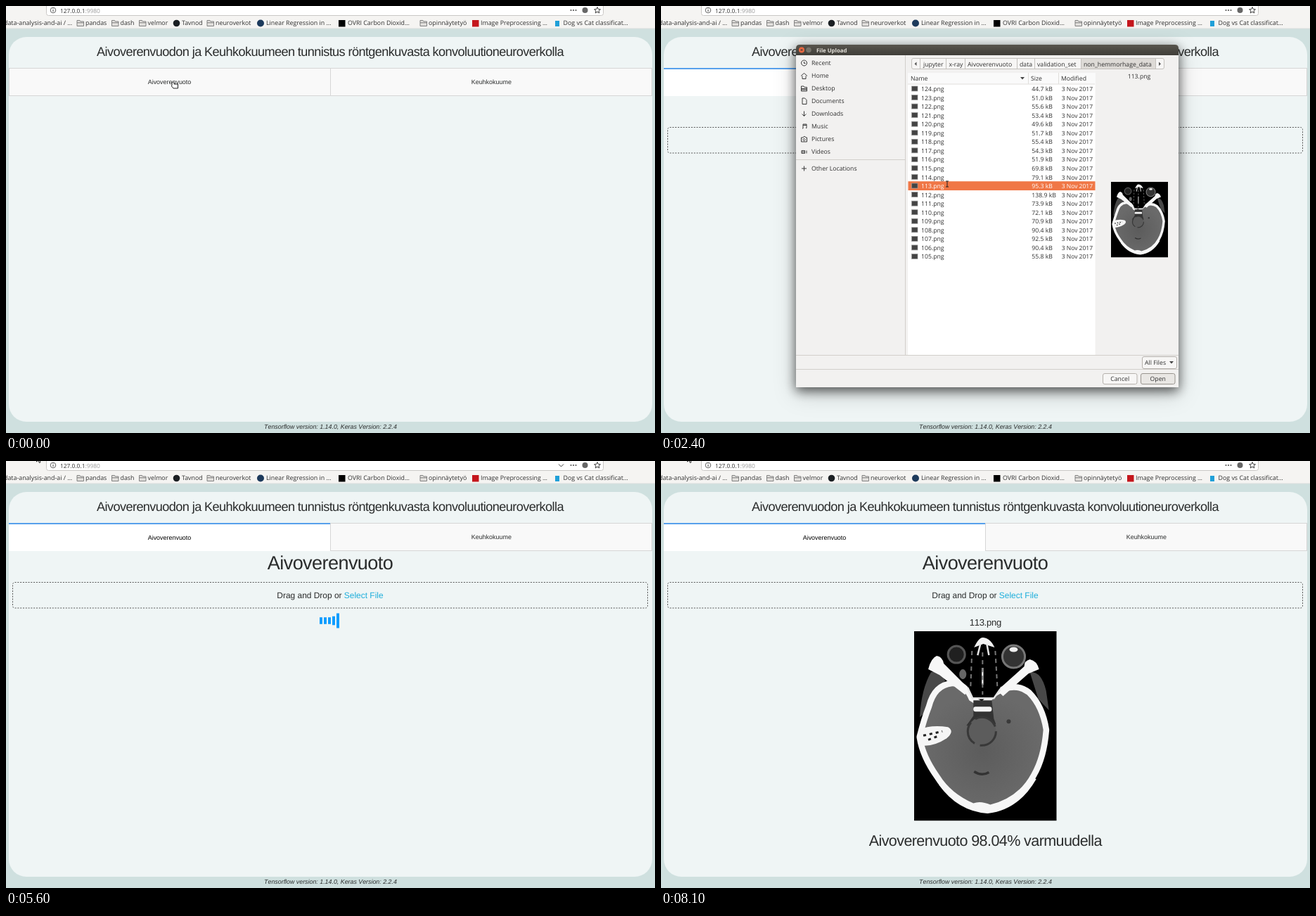
Animation, 923 px wide and 607 px high, one loop 9700 ms. Source, as an HTML page:

```html
<!DOCTYPE html>
<html lang="fi">
<head>
<meta charset="utf-8">
<title>Aivoverenvuoto</title>
<style>
html, body { margin: 0; width: 100%; height: 100%; overflow: hidden; background: #cfe0df; }
svg { display: block; }
text { font: 9px "Liberation Sans", Arial, sans-serif; font-kerning: none; text-rendering: geometricPrecision; fill: #2a2c2c; white-space: pre; }
.ui text { font: 500 8.7px "Open Sans", "Noto Sans", sans-serif; fill: #303030; }
.ui.bar text { font-size: 8.85px; }
.mid { text-anchor: middle; }
.tight { letter-spacing: -.6px; }
.line { fill: none; stroke: #3b3b3b; }
#dialog { filter: drop-shadow(0 5px 8px #0009) drop-shadow(0 6px 14px #0003); }
</style>
</head>
<body>
<svg id="stage" width="923" height="607" viewBox="0 0 923 607">
  <defs>
    <linearGradient id="dark" x2="0" y2="1"><stop stop-color="#58554d"/><stop offset="1" stop-color="#403e39"/></linearGradient>
    <radialGradient id="brain" cy=".55"><stop stop-color="#5c5c5c"/><stop offset="1" stop-color="#6a6a6a"/></radialGradient>
    <symbol id="scan" viewBox="0 0 202 269" preserveAspectRatio="none">
      <path d="M0 0H202V269H0Z"/>
      <path fill="#484848" d="M24 58Q38 54 44 70L28 104 8 122Q10 82 24 58ZM164 58Q180 56 187 84L191 112 176 96Z"/>
      <path fill="url(#brain)" stroke="#f7f7f7" stroke-width="17" stroke-linejoin="round" paint-order="stroke"
        d="M25 108Q32 80 54 78 70 78 78 98L97 110 116 92Q142 76 160 90 178 108 183 140 180 178 166 202 148 236 108 246 94 240 84 244 52 230 36 204 16 176 12 150 18 126 25 108Z"/>
      <path fill="#f7f7f7" d="M20 54Q24 38 32 35 40 36 42 46L78 82 72 90 36 62ZM177 54Q174 42 164 40 156 42 156 50L118 84 126 92 162 60Z"/>
      <path fill="none" stroke="#f7f7f7" stroke-width="7" d="M38 216Q64 252 104 255 146 250 170 208"/>
      <circle cx="60" cy="33" r="12" fill="#202020" stroke="#555" stroke-width="3"/>
      <circle cx="141" cy="36" r="16" fill="#333" stroke="#777" stroke-width="3"/>
      <ellipse cx="141" cy="26" rx="6" ry="3.5" fill="#eee"/>
      <path d="M80 22Q98 8 118 22L122 80 114 95H82L76 78Z"/>
      <path fill="#f2f2f2" d="M85 23Q92 8 98 9 108 10 114 23L98 18Z"/>
      <path fill="none" stroke="#e5e5e5" stroke-width="2.5" d="M94 18L90 34M103 18L106 34M97 52V76M76 80L83 95H113L122 82"/>
      <path fill="none" stroke="#777" stroke-width="2" stroke-dasharray="6 5" d="M82 28L80 80M115 28L118 80M97 30V90"/>
      <ellipse cx="69" cy="61" rx="5" ry="7" fill="#666"/>
      <path fill="#333" d="M84 98H110L113 124 116 132 74 134 84 120Z"/>
      <rect x="84" y="107" width="26" height="7" rx="3" fill="#f4f4f4"/>
      <circle cx="96" cy="142" r="20" fill="#5c5c5c" stroke="#383838" stroke-width="3" stroke-dasharray="34 8"/>
      <circle cx="134" cy="128" r="3" fill="#3a3a3a"/>
      <path fill="#f5f5f5" d="M6 140Q24 132 48 136 58 142 46 152 28 164 10 162Z"/>
      <path fill="none" stroke="#222" stroke-width="3" stroke-dasharray="4 5" d="M13 148L40 142M20 154L36 148"/>
      <path fill="none" stroke="#333" stroke-width="3.5" d="M85 199Q96 206 106 200"/>
    </symbol>
    <symbol id="slice" viewBox="0 0 96 108" preserveAspectRatio="none">
      <path d="M0 0H96V108H0Z"/>
      <path fill="#f4f4f4" d="M48 3C74 2 91 30 93 60 94 88 76 106 49 106 22 106 3 90 4 60 5 28 22 3 48 3Z"/>
      <path fill="#606060" d="M48 11C69 10 84 34 86 60 87 84 70 98 49 98 28 98 10 84 11 60 12 32 28 11 48 11Z"/>
      <path fill="none" stroke="#505050" stroke-width="3" d="M27 28Q18 46 20 70M72 28Q80 50 77 76M34 82Q26 76 27 64"/>
      <path fill="none" stroke="#2d2d2d" stroke-width="3" d="M30 20L40 14M36 24L46 26M56 14L66 22"/>
      <path fill="none" stroke="#8a8a8a" stroke-width="1.6" d="M48 12V98M42 34L48 40 56 34"/>
    </symbol>
  </defs>

  <path fill="#cfe0df" d="M0 0H923V607H0Z"/>
  <rect x="4" y="44" width="915" height="547" rx="25" fill="#eff5f5"/>
  <text class="mid tight" x="461" y="71" style="font-size:18.15px">Aivoverenvuodon ja Keuhkokuumeen tunnistus röntgenkuvasta konvoluutioneuroverkolla</text>
  <rect x="4.5" y="88.5" width="914" height="39" fill="#f9f9f9" stroke="#d6d6d6"/>
  <path stroke="#d6d6d6" d="M461.5 88V128"/>
  <g id="active"><path fill="#fff" d="M4 88H461V128H4Z"/><path fill="#1f80e6" d="M4 88.3H461V89.8H4Z"/></g>
  <text id="tab" class="mid" x="232.5" style="font-size:8.95px">Aivoverenvuoto</text>
  <text class="mid" x="690.3" y="111" style="font-size:8.95px">Keuhkokuume</text>
  <text class="mid" x="461.5" y="601" style="font-size:8.85px;font-style:italic">Tensorflow version: 1.14.0, Keras Version: 2.2.4</text>

  <g id="content">
    <text class="mid tight" x="461" y="153.5" style="font-size:27.1px">Aivoverenvuoto</text>
    <rect x="9.5" y="172.5" width="903" height="36.5" rx="3" fill="none" stroke="#555" stroke-dasharray="2 1.8"/>
    <text x="385.3" y="195" style="font-size:11.95px">Drag and Drop or <tspan id="link">Select File</tspan></text>
  </g>
  <g id="loader"></g>
  <text id="file" class="mid" x="461.3" y="233.5" style="font-size:13.1px;letter-spacing:-.3px">113.png</text>
  <text id="result" class="mid tight" x="461.3" y="547" style="font-size:21.55px">Aivoverenvuoto 98.04% varmuudella</text>
  <use id="photo" href="#scan" x="360" y="242" width="202.7" height="269.6"/>

  <g id="browser" class="ui bar"></g>
  <g id="dialog" class="ui"></g>
  <g id="cursor" stroke-linejoin="round">
    <path id="arrow" fill="#fff" stroke="#222" d="M.5 .5V10L2.8 8 4.4 11.5 6 10.8 4.5 7.4H7.5Z"/>
    <path id="hand" fill="#fff" stroke="#222" d="M-2 5V2Q-.5 0 1 2V4H6.5V10H0L-2.5 7Z"/>
    <path id="beam" fill="none" stroke="#222" d="M1 -1H5M3 -1V7M1 7H5"/>
  </g>
</svg>
<script>
const $ = id => document.getElementById(id);
const text = (x, y, s, extra = '') => `<text x="${x}" y="${y}" ${extra}>${s}</text>`;
const box = (x, y, w, h, fill, extra = '') => `<rect x="${x}" y="${y}" width="${w}" height="${h}" fill="${fill}" ${extra}/>`;
const path = (d, extra = 'class="line"') => `<path d="${d}" ${extra}/>`;
const dot = (x, y, r, fill) => `<circle cx="${x}" cy="${y}" r="${r}" fill="${fill}"/>`;
const grey = 'stroke="#c4c1bd"';

// Browser toolbar and bookmarks
const folders = [[101, 'pandas'], [150.5, 'dash'], [189.5, 'velmor'], [286, 'neuroverkot'], [589, 'opinnäytetyö']];
const links = [[-3, 'data-analysis-and-ai / …'], [250, 'Tavnod'], [370, 'Linear Regression in …'],
  [486, 'OVRI Carbon Dioxid…'], [675, 'Image Preprocessing …'], [792.5, 'Dog vs Cat classificat…']];
$('browser').innerHTML = box(0, 0, 923, 32, '#f5f4f2') + path('M0 32H923', 'stroke="#dcdfdd"')
  + box(57.5, -8, 792, 21.5, '#fff', 'rx="3" stroke="#c9c7c5"')
  + '<circle class="line" cx="67" cy="6" r="3.8" stroke-width=".8"/>' + path('M67 5.3V8M67 3.5V4.3')
  + text(77, 9.5, '127.0.0.1<tspan fill="#999">:9980</tspan>', 'style="font-size:8.4px"')
  + [803.5, 807, 810.5].map(x => dot(x, 6, 1.1, '#555')).join('') + dot(823.5, 6, 4, '#666')
  + path('M841 1.6L842.3 4.5 845.4 4.8 843 6.9 843.8 10 841 8.3 838.2 10 839 6.9 836.6 4.8 839.7 4.5Z')
  + path('M786 4.5L789.5 8 793 4.5', 'id="chevron" class="line"')
  + folders.map(([x, s]) => path(`M${x} 28.5V20.5H${x + 4}L${x + 5} 22H${x + 9.5}V28.5ZM${x} 23.8H${x + 9.5}`,
      'fill="#e2e0dd" stroke="#777" stroke-width=".9"') + text(x + 12, 27.3, s)).join('')
  + links.map(([x, s]) => text(x, 27.3, s)).join('')
  + dot(242.5, 24.5, 4.8, '#1b1f23') + dot(362, 24.5, 5, '#1d3a5c')
  + box(473, 20, 9.5, 9.5, '#000') + box(663, 20, 9.5, 9.5, '#c4161c') + box(781, 21, 6, 8, '#20a0d8');

// File dialog
const places = [
  ['Recent', 'M4.5 .5A4 4 0 1 0 4.6 .5M4.5 2.5V5H6.5'], ['Home', 'M0 5L4.5 1 9 5M2 5V9H7V5'],
  ['Desktop', 'M.5 8.5V1.5H4L5 3H8.5V8.5ZM.5 5H8.5M1 6.5H8'], ['Documents', 'M2 .5H5.5L8 3V9H2Z'],
  ['Downloads', 'M4.5 1V8M1.5 5L4.5 8 7.5 5'], ['Music', 'M3 7.5V1.5H8V7M2 7.5H3M7 7H8M3 3H8'],
  ['Pictures', 'M.5 2.5H3L4 1.2H6L7 2.5H8.5V8.5H.5ZM4.5 4A1.5 1.5 0 1 0 4.6 4'], ['Videos', 'M1 3H5.5V7H1ZM1 5H6M8 3V7']];
const crumbs = [[373, 'jupyter', 368], [409.5, 'x-ray', 405], [436, 'Aivoverenvuoto', 432],
  [510, 'data', 506], [535, 'validation_set', 531], [601, 'non_hemmorhage_data', 597]];
const sizes = ['44.7', '51.0', '55.6', '53.4', '49.6', '51.7', '55.4', '54.3', '51.9', '69.8',
  '79.1', '95.3', '138.9', '73.9', '72.1', '70.9', '90.4', '92.5', '90.4', '55.8'];
const place = (s, d, y) => `<g transform="translate(199 ${y - 4.5})">${path(d)}</g>` + text(214, y + 3, s);
const row = (size, i) => {
  const y = 121 + i * 12.55;
  return box(356.5, y - 7, 8.5, 7, '#444', 'stroke="#999" stroke-width=".7"') + `<g class="row">`
    + text(370, y, 124 - i + '.png') + `<g class="col">${text(526.5, y, size + ' kB')}`
    + text(569, y, '3 Nov 2017', 'style="font-size:8.5px"') + '</g></g>';
};
const button = (x, y, w, h, s, id = '') => box(x + .5, y + .5, w, h, '#f7f6f5', `rx="2.5" stroke="#b5b1ac" ${id}`)
  + text(x + w / 2 + .5, y + h / 2 + 3.5, s, 'class="mid"');
$('dialog').innerHTML = path('M192 542V60Q192 55 197 55H731Q736 55 736 60V542Z', 'fill="#f2f1f0"')
  + path('M192 70V60Q192 55 197 55H731Q736 55 736 60V70Z', 'fill="url(#dark)"')
  + dot(200, 62.5, 4, '#ee6a42') + dot(210, 62.5, 3.8, '#77746b') + path('M198.5 61L201.5 64M201.5 61L198.5 64')
  + text(221, 65.5, 'File Upload', 'style="font-size:7.8px;font-weight:700;fill:#e6e3dc"')
  + path('M347.5 70V496M192 496.5H736M192 516.5H736M192 218.5H347', 'fill="none" stroke="#d2cfcb"')
  + places.map(([s, d], i) => place(s, d, 81 + i * 18)).join('')
  + place('Other Locations', 'M1 4.5H8M4.5 1V8', 231)
  + box(356.5, 74.5, 359, 15, '#f7f6f5', 'rx="2.5" ' + grey) + box(597, 75, 106, 14, '#dddad6')
  + crumbs.map(([x, s, left]) => text(x, 85.5, s) + path(`M${left + .5} 75V89`, grey)).join('')
  + path('M703.5 75V89', grey) + path('M363.5 79.5V85L360.5 82.2ZM708 79.5V85L711 82.2Z', 'fill="#555"')
  + box(351, 95, 266.5, 401, '#fff') + box(351, 95, 266.5, 16, '#fafafa')
  + path('M522.5 95V111M565.5 95V111M351 111H617', 'stroke="#e0dedb"')
  + text(355, 106, 'Name') + text(526, 106, 'Size') + text(569, 106, 'Modified')
  + path('M511 101H517L514 104.5Z', 'fill="#444"')
  + box(351.5, 0, 266, 12.8, '#f07746', 'id="mark"') + sizes.map(row).join('')
  + text(680, 103, '', 'id="name" class="mid"')
  + '<use id="first" href="#slice" x="632" y="250" width="96.3" height="107.6"/>'
  + '<use id="second" href="#scan" x="640" y="250" width="81" height="107.6"/>'
  + button(684, 498, 49, 17, '') + text(688, 510, 'All Files') + path('M723 505H729L726 508.5Z', 'fill="#444"')
  + button(628, 522, 48.5, 15, 'Cancel') + button(682, 522, 48.5, 15, 'Open', 'id="open"');
$('open').setAttribute('stroke', '#98948e');

const bars = [446, 452, 458, 464, 470].map(x => {
  $('loader').insertAdjacentHTML('beforeend', box(x, 0, 4, 0, '#119dff'));
  return $('loader').lastChild;
});
const rows = [...document.querySelectorAll('.row')];

// Held positions: [time, x, y] for the pointer, [time, phase] for the loader
const moves = [[0, 238, 107], [800, 300, 125], [900, 385, 148], [1000, 460, 172], [1100, 509, 187], [1400, 507, 191],
  [1600, 485, 205], [1700, 456, 222], [1800, 428, 238], [1900, 408, 248], [2000, 404, 250],
  [5200, 332, 159], [5400, 97, 16], [5600, 43, -9], [6300, 37, -9]];
const phases = [[3200, .784], [3400, .984], [3800, .184], [4000, .384], [4200, .584], [4600, .984], [5000, .11],
  [5200, .29], [5400, .49], [5600, .71], [6300, .27], [6500, .47], [6700, .67], [6800, .77], [6900, .9], [7400, .17], [7600, .37]];
const at = (list, t) => list.findLast(step => step[0] <= t) || list[0];
const show = (id, on) => $(id).setAttribute('visibility', on ? 'visible' : 'hidden');
const ease = x => x * x * (3 - 2 * x);

function stretch(phase) {
  const p = (phase + 1.2) % 1.2 / .24;
  return .4 + .6 * (p < 1 ? ease(p) : p < 2 ? ease(2 - p) : 0);
}

function draw(now) {
  const t = now % 9700, picked = t >= 2000, open = t >= 1300 && t < 3200;
  show('active', t >= 400);
  $('tab').setAttribute('y', t < 400 ? 111 : 112);
  $('tab').style.fill = t < 400 ? '' : '#000';
  show('content', t >= 500);
  $('link').style.fill = t >= 1100 && t < 1300 ? '#0fa0ce' : '#1eaedb';

  $('dialog').style.display = open ? '' : 'none';
  $('dialog').style.opacity = t < 1400 ? .6 : 1;
  const chosen = picked ? 11 : 0;
  $('mark').setAttribute('y', 111.2 + chosen * 12.55);
  rows.forEach((r, i) => {
    for (const label of r.querySelectorAll('text')) label.style.fill = i === chosen ? '#fff' : '';
    r.querySelector('.col').setAttribute('transform', `translate(${picked ? .7 : 0} 0)`);
  });
  $('name').textContent = 124 - chosen + '.png';
  $('first').style.display = picked ? 'none' : '';
  $('second').style.display = picked ? '' : 'none';
  $('open').setAttribute('fill', t >= 2200 ? '#e9e7e4' : '#f7f6f5');

  show('loader', t >= 3200 && t < 7800);
  const phase = at(phases, t)[1];
  bars.forEach((bar, i) => {
    const h = 24 * stretch(phase - i * .1);
    bar.setAttribute('y', 227 - h / 2);
    bar.setAttribute('height', h);
  });
  show('chevron', t >= 5600 && t < 6300);
  show('file', t >= 7800);
  show('result', t >= 7900);
  show('photo', t >= 8100);

  const [, x, y] = at(moves, t);
  const hand = t < 800 || t >= 1100 && t < 1400, beam = t >= 2400 && t < 3200;
  $('cursor').setAttribute('transform', `translate(${x} ${y})`);
  show('hand', hand);
  show('beam', beam);
  show('arrow', !hand && !beam);
  requestAnimationFrame(draw);
}
draw(0);
</script>
</body>
</html>
```
